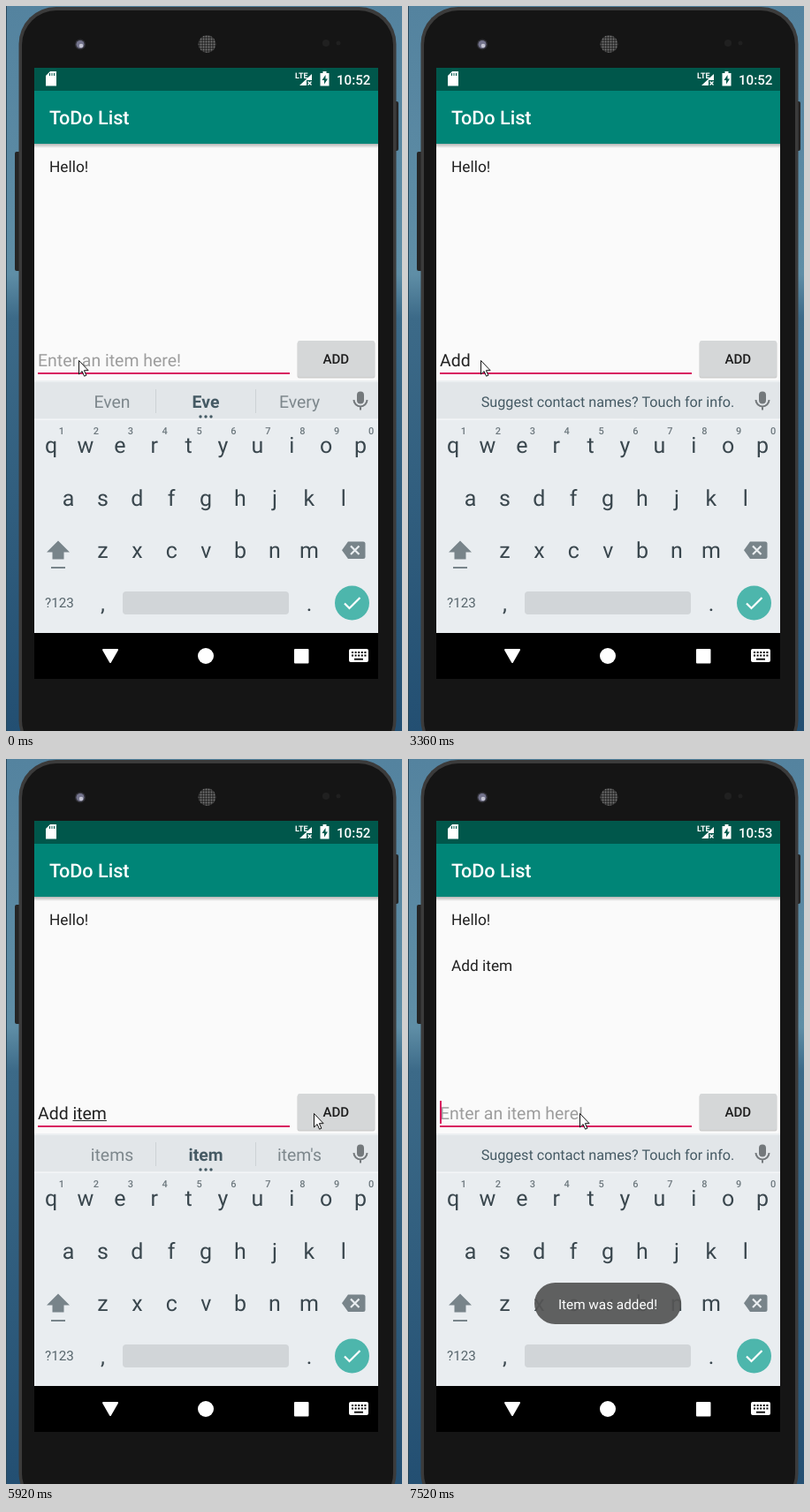
These frames come from a looping animation (448 px wide and 821 px high, 8000 ms). An HTML page:

```html
<!DOCTYPE html>
<html lang="en">
<head>
<meta charset="utf-8">
<title>ToDo List</title>
<style>
  html, body { margin: 0; width: 100%; height: 100%; overflow: hidden; background: #4b7b98; }
  svg { display: block; width: 100%; height: 100%; }
  text { font-family: Roboto, sans-serif; white-space: pre; text-rendering: geometricPrecision; }
  .mid { text-anchor: middle; }
  .key { font-size: 25px; fill: #3a474e; }
  .digit { font-size: 11px; font-weight: 500; fill: #6d787e; }
  .edit { font-size: 19.45px; }
  .item { font-size: 17.3px; fill: #212121; }
  .side { font-size: 19.4px; fill: #7d878c; }
  .centre { font-size: 19.4px; fill: #455a64; }
</style>
</head>
<body>
<svg viewBox="0 0 448 821" preserveAspectRatio="none">
  <defs>
    <linearGradient id="sky" x2="0" y2="1">
      <stop offset="0" stop-color="#54839f"/>
      <stop offset=".37" stop-color="#5f8ea6"/>
      <stop offset=".43" stop-color="#3c6a88"/>
      <stop offset="1" stop-color="#234f72"/>
    </linearGradient>
    <linearGradient id="shade" x2="0" y2="1">
      <stop offset="0" stop-opacity=".28"/>
      <stop offset="1" stop-opacity="0"/>
    </linearGradient>
    <pattern id="mesh" width="3" height="3" patternUnits="userSpaceOnUse">
      <rect width="3" height="3" fill="#2c2c2c"/>
      <circle cx="1.5" cy="1.5" r="1" fill="#777"/>
    </pattern>
  </defs>

  <!-- Wallpaper and phone body -->
  <rect width="448" height="821" fill="url(#sky)"/>
  <rect width="1" height="821" fill="#28485c"/>
  <rect x="10" y="165" width="8" height="135" rx="2" fill="#252525"/>
  <rect x="436" y="108" width="8" height="56" rx="2" fill="#252525"/>
  <rect x="14.5" y="1" width="427" height="850" rx="42" fill="#3b3b3b"/>
  <rect x="18" y="5" width="420" height="843" rx="39" fill="#151515"/>
  <circle cx="84" cy="43.5" r="6" fill="#303036"/>
  <circle cx="84" cy="43.5" r="4.5" fill="#73738c"/>
  <circle cx="85" cy="45" r="2.3" fill="#c4c4d2"/>
  <circle cx="227.500" cy="43" r="10" fill="url(#mesh)"/>
  <circle cx="362" cy="42" r="4" fill="#202020"/>
  <circle cx="376" cy="42" r="2.500" fill="#202020"/>

  <!-- Status bar and toolbar -->
  <rect x="32" y="70" width="389" height="692" fill="#fafafa"/>
  <rect x="32" y="70" width="389" height="26" fill="#00574b"/>
  <rect x="32" y="96" width="389" height="60" fill="#008577"/>
  <rect x="32" y="156" width="389" height="5" fill="url(#shade)"/>
  <g fill="#fff">
    <path d="M50 74h7v16.500h-12v-11.500z"/>
    <path d="M49.500 76v3M52 76v3M54.500 76v3" stroke="#00574b"/>
    <text x="327" y="82" font-size="9" font-weight="700">LTE</text>
    <path d="M346 77v7h-6v6h-8z"/>
    <path d="M341.500 85.500l4 4m0-4l-4 4" stroke="#fff" stroke-width="1.300"/>
    <path d="M358.500 74h4v2h3v14.500h-10v-14.500h3z"/>
    <path d="M361.500 78l-4 6h2.500v4.500l4-6h-2.500z" fill="#00574b"/>
    <text id="clock" x="374" y="88.500" font-size="15.130" font-weight="500"></text>
    <text x="49" y="134" font-size="21.600" font-weight="500">ToDo List</text>
  </g>

  <!-- List and entry row -->
  <text class="item" x="49" y="188">Hello!</text>
  <text class="item" id="added" x="49" y="240">Add item</text>
  <text class="edit" id="hint" x="36" y="408" fill="#9d9d9d">Enter an item here!</text>
  <text class="edit" id="typed" x="36" y="408" fill="#212121"></text>
  <rect id="wordLine" y="409" height="1.100" fill="#333"/>
  <rect x="36" y="415" width="285" height="2" fill="#d81b60"/>
  <rect id="caret" y="387" width="2" height="26" fill="#d81b60"/>
  <rect x="329.500" y="380" width="88" height="41.500" rx="2.500" opacity=".18"/>
  <rect id="button" x="330" y="379" width="87" height="41" rx="2"/>
  <text class="mid" x="373.300" y="404.500" font-size="15.130" font-weight="500" fill="#1d1d1d">ADD</text>

  <!-- Keyboard -->
  <rect x="32" y="424" width="389" height="286" fill="#e9edf0"/>
  <rect x="32" y="424" width="389" height="44" fill="#e2e6e9"/>
  <rect x="32" y="424" width="389" height="2" fill="#eceff1"/>
  <rect x="32" y="467.500" width="389" height="1.200" fill="#f8fafb"/>
  <g id="words">
    <path d="M169.500 434v27M282.500 434v27" stroke="#cdd2d5"/>
    <g fill="#455a64">
      <circle cx="220" cy="465" r="1.700"/><circle cx="226" cy="465" r="1.700"/><circle cx="232" cy="465" r="1.700"/>
    </g>
    <text class="mid side" x="120" y="455"></text>
    <text class="mid centre" x="226" y="455"></text>
    <text class="mid side" x="332" y="455"></text>
  </g>
  <text id="tip" class="mid" x="226" y="454" font-size="16.200" fill="#455a64">Suggest contact names? Touch for info.</text>
  <g fill="none" stroke="#74797c" stroke-width="2">
    <rect x="398" y="437.500" width="6" height="12" rx="3" fill="#74797c"/>
    <path d="M393.500 446a7.500 7.500 0 0 0 15 0M401 453.500v4"/>
  </g>
  <g id="keys"></g>
  <path d="M46 618.500l13-13 13 13h-6.500v8h-13v-8z" fill="#78848a"/>
  <rect x="51" y="635" width="16" height="2" fill="#78848a"/>
  <path d="M387 606.500h17q2.500 0 2.500 2.500v14.500q0 2.500-2.500 2.500h-17l-7-9.700z" fill="#78848a"/>
  <path d="M390 611.500l9.500 9.500m0-9.500l-9.500 9.500" stroke="#e9edf0" stroke-width="2.200"/>
  <text class="mid" x="60.500" y="681" font-size="15.200" fill="#57656c">?123</text>
  <rect x="132" y="663" width="188" height="26" rx="4" fill="#d1d5d8"/>
  <circle cx="391.500" cy="676" r="19.500" fill="#4db6ac"/>
  <path d="M383 676.500l5.500 5.500 12-12" fill="none" stroke="#fff" stroke-width="2.200"/>

  <!-- Navigation bar -->
  <rect x="32" y="710" width="389" height="52"/>
  <g fill="#fff">
    <path d="M110 729h16l-8 14z" stroke="#fff" stroke-width="2" stroke-linejoin="round"/>
    <circle cx="226" cy="736" r="9"/>
    <rect x="326" y="728" width="16.500" height="16.500" rx="1"/>
    <rect x="388" y="728" width="22" height="15" rx="2"/>
  </g>
  <path d="M391 732h16.500M391 735.500h16.500" stroke="#000" stroke-width="2" stroke-dasharray="2 1.600"/>
  <path d="M394 739.700h10" stroke="#000" stroke-width="1.800"/>

  <g id="toast">
    <rect x="143" y="593" width="166" height="47" rx="23.500" fill="#565656" opacity=".93"/>
    <text class="mid" x="226" y="623" font-size="15.300" fill="#fff">Item was added!</text>
  </g>
  <path id="mouse" d="M.5 .5v15.500l3.600-3.400 2.500 5.600 2.300-1-2.500-5.500h4.700z" fill="#fff" stroke="#111"/>
</svg>
<script>
const LOOP = 8000;
const el = id => document.getElementById(id);
const show = (id, on) => el(id).setAttribute('visibility', on ? 'visible' : 'hidden');

function addKey(label, x, y, style = 'key') {
  const key = document.createElementNS('http://www.w3.org/2000/svg', 'text');
  key.setAttribute('class', 'mid ' + style);
  key.setAttribute('x', x);
  key.setAttribute('y', y);
  key.textContent = label;
  el('keys').append(key);
}

const PITCH = 38.9;
[['qwertyuiop', 51, 506], ['asdfghjkl', 70.5, 566], ['zxcvbnm', 109.5, 625]].forEach(([row, x, y]) =>
  [...row].forEach((letter, i) => addKey(letter, x + i * PITCH, y)));
[...'1234567890'].forEach((digit, i) => addKey(digit, 63 + i * PITCH, 485, 'digit'));
addKey(',', 109.5, 685);
addKey('.', 343, 685);

// Each step changes part of the state; "word" is where the underlined word begins (-1: none).
const steps = [
  [0, { text: '', word: -1, caret: false, words: ['Even', 'Eve', 'Every'], bold: true,
        mouse: [82, 401], pressed: false, added: false, toast: 0 }],
  [300, { caret: true }],
  [960, { caret: false }],
  [1360, { caret: true }],
  [1510, { text: 'A', word: 0, words: ['At', 'A', 'As'], bold: false }],
  [2130, { caret: false }],
  [2280, { text: 'Ad', caret: true }],
  [2410, { text: 'Add', words: ['AD', 'Ad', 'As'], bold: true }],
  [2560, { words: ['ADD', 'Add', 'Aid'] }],
  [2960, { text: 'Add ', word: -1 }],
  [3080, { words: null }],
  [3360, { caret: false }],
  [3920, { caret: true }],
  [4320, { text: 'Add i' }],
  [4470, { word: 4, words: ['is', 'I', 'in'] }],
  [4720, { text: 'Add ite', word: -1 }],
  [4870, { word: 4, words: ['ITE', 'ite', "it's"], bold: false }],
  [5020, { text: 'Add item', word: -1 }],
  [5140, { word: 4, words: ['items', 'item', "item's"], bold: true }],
  [5540, { mouse: [152, 401] }],
  [5680, { mouse: [255, 401], caret: false }],
  [5800, { mouse: [325, 401] }],
  [5920, { mouse: [348, 401] }],
  [6040, { mouse: [350, 401] }],
  [6160, { caret: true }],
  [6470, { pressed: true }],
  [6590, { text: '', word: -1, words: null, added: true, toast: 0.08 }],
  [6710, { toast: 0.35 }],
  [6830, { toast: 0.75, pressed: false }],
  [6980, { toast: 1 }],
  [7130, { mouse: [200, 402], caret: false }],
  [7280, { mouse: [197, 402] }],
  [7400, { mouse: [194, 401] }],
  [7520, { caret: true }],
];

function draw() {
  const time = performance.now() % LOOP;
  const state = Object.assign({}, ...steps.filter(([start]) => start <= time).map(([, change]) => change));
  const { text, word, words } = state;
  const typed = el('typed');

  el('clock').textContent = state.added ? '10:53' : '10:52';
  show('added', state.added);
  show('hint', !text);
  typed.textContent = text;

  const left = 36;
  const end = left + (text ? typed.getComputedTextLength() : 0);
  const wordStart = left + (word > 0 ? typed.getSubStringLength(0, word) : 0);
  show('wordLine', word >= 0);
  el('wordLine').setAttribute('x', wordStart);
  el('wordLine').setAttribute('width', end - wordStart);
  show('caret', state.caret);
  el('caret').setAttribute('x', Math.max(36, Math.round(end - 0.7)));

  show('words', words);
  show('tip', !words);
  const labels = el('words').querySelectorAll('text');
  if (words) labels.forEach((label, i) => label.textContent = words[i]);
  labels[1].style.fontWeight = state.bold ? 700 : 400;

  el('button').setAttribute('fill', state.pressed ? '#c0c1c2' : '#d5d7d8');
  el('toast').setAttribute('opacity', state.toast);
  el('mouse').setAttribute('transform', `translate(${state.mouse})`);
  requestAnimationFrame(draw);
}
draw();
</script>
</body>
</html>
```
